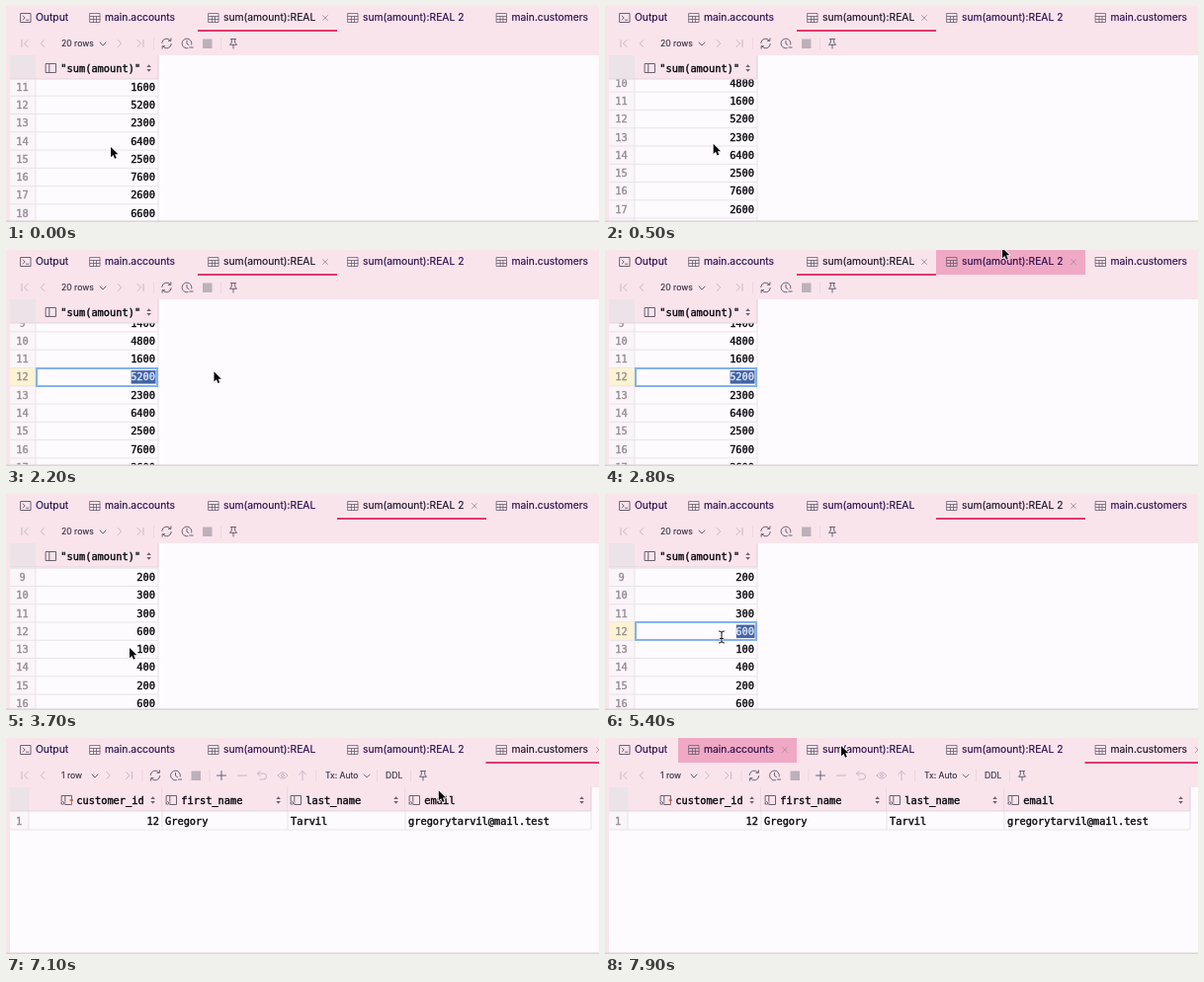
Recreate the animation shown at these times as an HTML page with a canvas. Size 600 px wide and 219 px high, loop 8000 ms.

```html
<!DOCTYPE html>
<html lang="en">
<head>
<meta charset="utf-8">
<title>Query results</title>
<style>
html, body { margin: 0; width: 100%; height: 100%; overflow: hidden; background: #fdfbfe; }
canvas { display: block; width: 600px; height: 219px; }
</style>
</head>
<body>
<canvas id="stage"></canvas>
<script>
const LOOP = 8000, PITCH = 18.28;
const UI = 'Inter, sans-serif', MONO = '"DejaVu Sans Mono", monospace';
const PINK = '#f9e4ec', PAPER = '#fdfbfe', LINE = '#e9e3e9', ICON = '#6c6070', FAINT = '#c6b5c1', INK = '#0c0a10';

const canvas = document.getElementById('stage');
const c = canvas.getContext('2d');
const dpr = window.devicePixelRatio || 1;
canvas.width = 600 * dpr;
canvas.height = 219 * dpr;

const tabs = [
  { x: 74, end: 194, name: 'main.accounts' },
  { x: 194, end: 335, name: 'sum(amount):REAL' },
  { x: 335, end: 486, name: 'sum(amount):REAL 2' },
  { x: 485.5, end: 612, name: 'main.customers' }
];
const sums = {
  1: [900, 3100, 1200, 4200, 800, 3700, 2100, 5600, 1400, 4800, 1600, 5200, 2300, 6400, 2500, 7600, 2600, 6600, 2800, 7100],
  2: [100, 200, 100, 400, 300, 500, 100, 300, 200, 300, 300, 600, 100, 400, 200, 600, 300, 500, 200, 400]
};
const columns = [
  { x: 23, end: 158, icon: 56, name: 'customer_id', value: '12', key: true },
  { x: 158, end: 285, icon: 162, name: 'first_name', value: 'Gregory' },
  { x: 285, end: 404, icon: 288, name: 'last_name', value: 'Tarvil' },
  { x: 404, end: 592, icon: 408, name: 'email', value: 'gregorytarvil@mail.test' }
];
// Pointer path: time, x, y
const path = [
  [0, 106, 143], [300, 106, 143], [900, 120, 131], [1250, 120, 131], [1400, 172, 110],
  [1900, 188, 137], [2100, 188, 137], [2600, 400, 8], [2800, 402, -2], [2950, 400, 4],
  [3500, 125, 156], [3700, 125, 156], [4400, 118, 145], [5450, 118, 145], [6200, 536, 7],
  [6400, 537, 6], [6600, 537, 6], [7200, 430, 57], [7600, 130, 14], [7900, 239, 8], [8000, 250, 9]
];

const ease = p => p * p * (3 - 2 * p);
const clamp = v => Math.max(0, Math.min(1, v));

function pointer(t) {
  const i = Math.max(1, path.findIndex(k => k[0] >= t));
  const a = path[i - 1], b = path[i];
  const p = ease(clamp((t - a[0]) / (b[0] - a[0])));
  return [a[1] + (b[1] - a[1]) * p, a[2] + (b[2] - a[2]) * p];
}

function box(x, y, w, h, color) {
  c.fillStyle = color;
  c.fillRect(x, y, w, h);
}
// A hairline stroke gives the text its slightly heavy weight
function text(s, x, y, { size = 10.3, font = UI, color = INK, align = 'left', weight = .15 } = {}) {
  c.font = `${size}px ${font}`;
  c.fillStyle = c.strokeStyle = color;
  c.textAlign = align;
  c.lineWidth = weight;
  c.fillText(s, x, y);
  c.strokeText(s, x, y);
}
const mono = (s, x, y, color = INK, align = 'left') =>
  text(s, x, y + 3.8, { size: 10.33, font: MONO, color, align, weight: .4 });

// Strokes an SVG path with its own origin at (x, y)
function icon(d, x, y, color = ICON, width = 1) {
  c.save();
  c.translate(x, y);
  c.strokeStyle = color;
  c.lineWidth = width;
  c.lineCap = c.lineJoin = 'round';
  c.stroke(new Path2D(d));
  c.restore();
}

const GRID = 'M-5-4.5h10v9h-10zM-5-1.5h10M-5 1.5h10M-1.5-1.5v6M1.5-1.5v6';
const LEFT = 'M1.7-3.5L-1.7 0L1.7 3.5', RIGHT = 'M-1.7-3.5L1.7 0L-1.7 3.5', DOWN = 'M-3-1.5L0 1.5L3-1.5';
const CLOSE = 'M-2.5-2.5L2.5 2.5M2.5-2.5L-2.5 2.5';
const REFRESH = 'M-4.8-.5A4.8 4.8 0 0 1 3.8-3M4.8.5A4.8 4.8 0 0 1-3.8 3M4.4-5.2v2.5h-2.5M-4.4 5.2v-2.5h2.5';
const CLOCK = 'M4.8 1A4.9 4.9 0 1 0 1 4.8M0-2.7V.3L2 1.6M2.8 4h3.4';
const PIN = 'M-2.5-4.5h5M-1.7-4.5v3.5L-3.5 1.3h7L1.7-1v-3.5M0 1.3v3.7';
const UNDO = 'M-2-4.5L-4.5-2L-2 .5M-4.5-2H1.5A3 3 0 0 1 1.5 4H-2';
const EYE = 'M-5 0Q0-6.5 5 0Q0 6.5-5 0M1.5 0A1.5 1.5 0 1 0-1.5 0A1.5 1.5 0 1 0 1.5 0';
const UP = 'M0 4.5v-9M-3.5-1L0-4.5L3.5-1';

function drawTabs(active, hovered) {
  box(0, 0, 600, 50, PINK);
  icon('M-5-4.5h10v9h-10zM-2.8-2L-.8 0L-2.8 2M.5 2.2h2.3', 20, 12);
  text('Output', 30, 15.3, { color: '#2a0a4c' });
  tabs.forEach((tab, i) => {
    if (i === hovered) box(tab.x, 0, tab.end - tab.x, 25, '#f0a9c4');
    if (i === active) box(tab.x, 24, tab.end - tab.x, 2, '#e03a6c');
    icon(GRID, tab.x + 16, 12, ICON, .8);
    text(tab.name, tab.x + 26, 15.3, { color: i === active ? '#1c1024' : '#2a0a4c' });
    if (i === active || i === hovered) icon(CLOSE, tab.end - 12, 12, '#ad8fa0', .9);
  });
}

function drawToolbar(customers) {
  const y = 38, shift = customers ? -11.5 : 0;
  const label = (s, x) => text(s, x, 41.2, { size: 8.6, color: '#3c3040' });
  const rule = x => box(x, 32, 1, 12, '#ecd6e0');
  icon('M-3-3.5v7M3-3.5L-.5 0L3 3.5', 19, y, FAINT);
  icon(LEFT, 37, y, FAINT);
  label(customers ? '1 row' : '20 rows', 56);
  icon(DOWN, 98 + (customers ? -8 : 0), y + .5);
  icon(RIGHT, 115 + shift, y, FAINT);
  icon('M3-3.5v7M-3-3.5L.5 0L-3 3.5', 136 + shift, y, FAINT);
  rule(149 + shift);
  icon(REFRESH, 162.5 + shift, y);
  icon(CLOCK, 183 + shift, y);
  box(199 + shift, 33.5, 9.5, 9.5, '#bdb0b8');
  rule(217 + shift);
  if (customers) {
    icon('M-4.5 0h9M0-4.5v9', 218, y);
    icon('M-4.5 0h9', 239, y, FAINT);
    icon(UNDO, 259, y, FAINT);
    icon(EYE, 280, y, FAINT);
    icon(UP, 300, y, FAINT);
    rule(313);
    label('Tx: Auto', 323);
    icon(DOWN, 365, y + .5, ICON, .9);
    rule(375);
    label('DDL', 384);
    rule(409);
  }
  icon(PIN, customers ? 422 : 230, y);
}

function drawHeader(x, end, iconX, name, key) {
  box(x, 50, end - x, 24, PINK);
  icon('M0-4.5h10v9h-10zM3.3-4.5v9', iconX + .5, 63);
  if (iconX !== 40) {
    box(iconX - .5, 64, 4, 4.5, PINK);
    icon('M2.8 3A1.4 1.4 0 1 0 0 3A1.4 1.4 0 1 0 2.8 3', iconX, 63);
  }
  if (key) icon('M9 0A1.3 1.3 0 1 0 11.6 0A1.3 1.3 0 1 0 9 0M10.3 1.3v3.5', iconX, 63, '#d9775a');
  mono(name, iconX + 15.3, 63);
  c.fillStyle = ICON;
  c.fill(new Path2D(`M${end - 11.7} 62l2.3-2.7 2.3 2.7zM${end - 11.7} 64l2.3 2.7 2.3-2.7z`));
  box(end - .5, 50, 1, 24, '#e2ccd7');
}

function drawSums(values, first, editing) {
  box(4, 50, 26, 24, '#ebe3e8');
  drawHeader(30, 154, 40, '"sum(amount)"');
  c.save();
  c.beginPath();
  c.rect(0, 74, 600, 144);
  c.clip();
  box(4, 74, 26, 144, '#faf5f9');
  values.forEach((value, i) => {
    const y = first + i * PITCH;
    const edit = editing && i === 11;
    if (edit) {
      const width = String(value).length * 6.22;
      box(4, y - 9, 26, PITCH, '#fdf3d3');
      box(151.5 - width, y - 6.5, width, 13.5, '#4364a6');
    }
    box(4, y + 8.7, 150, 1, LINE);
    mono(i + 1, 16.5, y, '#968c95', 'center');
    mono(value, 151, y, edit ? '#dde6f8' : INK, 'right');
  });
  box(29.5, 74, 1, 144, LINE);
  box(153.5, 74, 1, 144, LINE);
  if (editing) {
    c.strokeStyle = '#82b1ee';
    c.lineWidth = 2;
    c.strokeRect(31, Math.round(first + 11 * PITCH - 9), 122, 18);
  }
  c.restore();
  box(4, 73.5, 150, 1, '#e6d5de');
}

function drawCustomers() {
  box(4, 50, 19, 24, '#ebe3e8');
  box(4, 74, 19, 19, '#faf5f9');
  mono('1', 13, 84, '#968c95', 'center');
  for (const col of columns) {
    drawHeader(col.x, col.end, col.icon, col.name, col.key);
    box(col.end - .5, 74, 1, 19, LINE);
    if (col.key) mono(col.value, col.end - 3, 84, INK, 'right');
    else mono(col.value, col.x + 3, 84);
  }
  box(22.5, 50, 1, 43, LINE);
  box(4, 73.5, 588, 1, '#e6d5de');
  box(4, 92.5, 588, 1, LINE);
}

function drawPointer(x, y, beam) {
  if (beam) {
    const d = 'M-2.5-6Q0-6 0-4.5Q0-6 2.5-6M0-4.5v9M-2.5 6Q0 6 0 4.5Q0 6 2.5 6M-1.5 1.5h3';
    icon(d, x, y, '#fff', 2.2);
    icon(d, x, y, '#111', 1);
    return;
  }
  const d = 'M0 0V10.2L2.4 8L4 11.7L5.8 10.9L4.2 7.3H7.4Z';
  icon(d, x, y, '#fff', 1.6);
  c.save();
  c.translate(x, y);
  c.fillStyle = '#0a0a0a';
  c.fill(new Path2D(d));
  c.restore();
}

function draw(t) {
  const active = t < 2900 ? 1 : t < 6400 ? 2 : 3;
  const editing = active === 1 ? t >= 1100 : t >= 4800;
  const first = active === 1 ? -100.8 + 28.3 * ease(clamp((t - 200) / 600)) : -62;
  const [x, y] = pointer(t);
  // Hover highlight trails the pointer
  const [hx, hy] = pointer(Math.max(0, t - 150));
  const hovered = hy < 25 ? tabs.findIndex(tab => hx >= tab.x && hx < tab.end) : -1;
  const inCell = x > 30 && x < 154 && Math.abs(y - first - 11 * PITCH) < 9;

  c.setTransform(dpr, 0, 0, dpr, 0, 0);
  box(0, 0, 600, 219, PAPER);
  drawTabs(active, hovered);
  drawToolbar(active === 3);
  if (active === 3) drawCustomers();
  else drawSums(sums[active], first, editing);
  box(0, 50, 4, 169, PINK);
  box(0, 217.5, 600, 1.5, '#ddd2d9');
  drawPointer(x, y, active < 3 && editing && inCell);
}

const start = performance.now();
function frame() {
  draw((performance.now() - start) % LOOP);
  requestAnimationFrame(frame);
}
frame();
</script>
</body>
</html>
```
